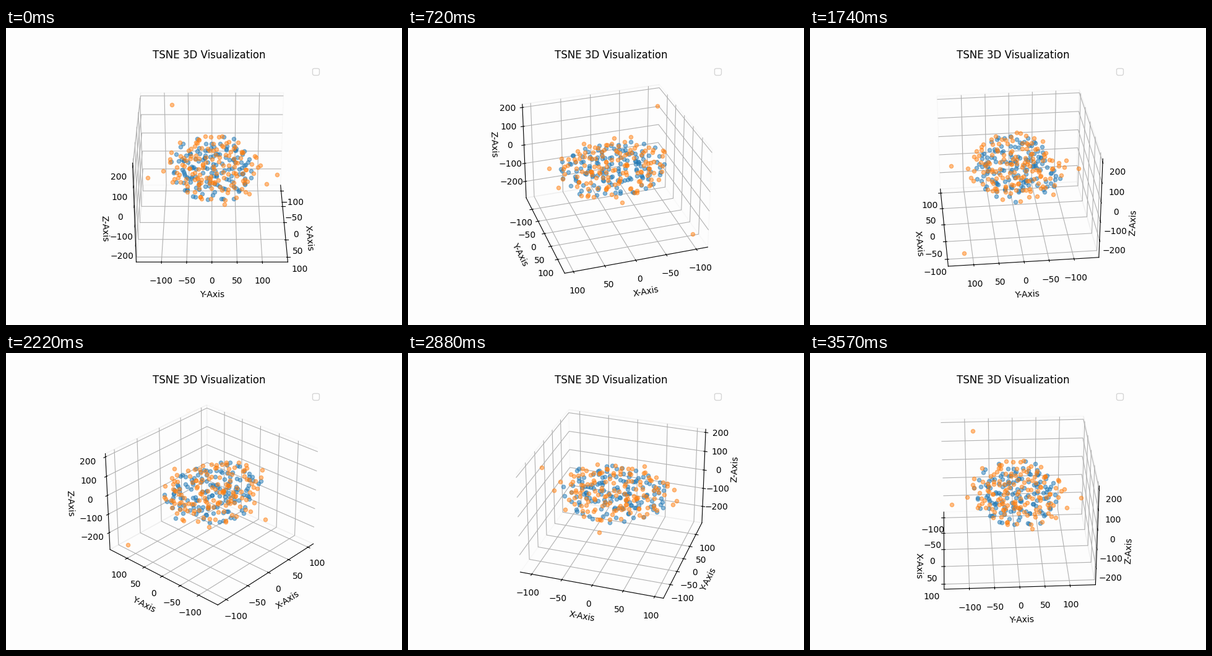
Recreate the animation shown at these times as a matplotlib script. Size 640 by 480 pixels, loop 3.6 s.

```python
import matplotlib.pyplot as plt
import numpy as np
from matplotlib.animation import FuncAnimation

FRAMES = 120
STEP = 360 / FRAMES
GOLDEN_ANGLE = np.pi * (3 - 5 ** 0.5)

# The few points that lie clear of the cloud, as (x, y, z).
OUTLIERS = [(-98, -84, 183), (-103, 118, -259), (7, -131, -36), (17, 131, -4)]


def ball(rng, count, radius):
    """Fill a ball evenly: spiral directions with shuffled radii."""
    i = np.arange(count) + 0.5
    height = 1 - 2 * i / count
    ring = np.sqrt(1 - height ** 2)
    angle = GOLDEN_ANGLE * i + rng.uniform(0, 2 * np.pi)
    directions = np.column_stack(
        [ring * np.cos(angle), ring * np.sin(angle), height])
    radii = radius * np.cbrt(rng.permutation(i) / count)
    return directions * radii[:, None]


def style_axis(axis, label, span, step):
    axis.set_label_text(label)
    axis.set_ticks(range(-span, span + 1, step))
    axis.pane.set_fill(False)


rng = np.random.default_rng(4)
blue = ball(rng, 135, 95)
orange = np.vstack([ball(rng, 136, 103), OUTLIERS])

fig = plt.figure(figsize=(6.4, 4.8), dpi=100, facecolor="#fdfdfd")
ax = fig.add_subplot(projection="3d", facecolor="none")

for cloud, color in ((blue, "tab:blue"), (orange, "tab:orange")):
    ax.scatter(*cloud.T, color=color, alpha=0.5, depthshade=False)

style_axis(ax.xaxis, "X-Axis", 100, 50)
style_axis(ax.yaxis, "Y-Axis", 100, 50)
style_axis(ax.zaxis, "Z-Axis", 200, 100)
ax.set_xlim(-119.2, 113.8)
ax.set_ylim(-150, 150.6)
ax.set_zlim(-292.6, 216.8)
ax.set_title("TSNE 3D Visualization")
ax.legend(handles=[], labels=[])


def update(i):
    # The tiny offset keeps the visible walls definite at right angles.
    ax.view_init(elev=30, azim=STEP * i + 1e-3)
    return ()


anim = FuncAnimation(fig, update, frames=FRAMES, interval=30,
                     init_func=lambda: update(0), repeat=True)
plt.show()
```
